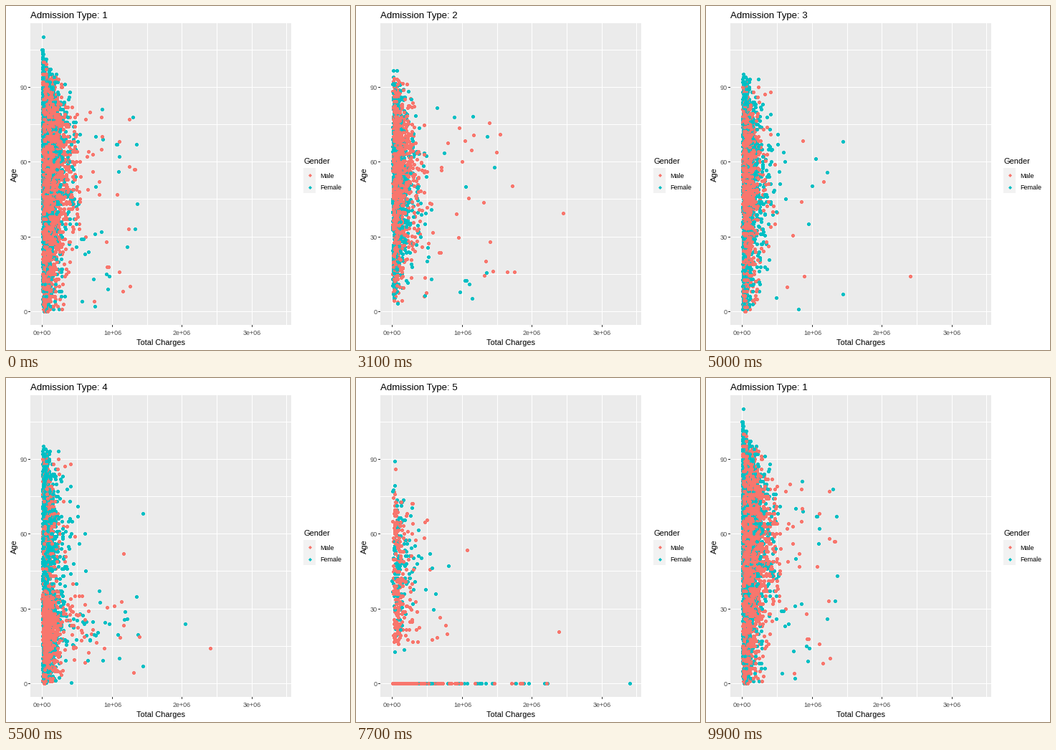
Recreate the animation shown at these times as a matplotlib script. Size 480 px wide and 480 px high, loop 10000 ms.

```python
import numpy as np
import matplotlib.pyplot as plt
from matplotlib.animation import FuncAnimation
from matplotlib.patches import Rectangle

SIZE, DPI = 480, 96
PT = 72 / DPI                       # points per pixel
RED, TEAL = "#F8766D", "#00BFC4"
PALETTE = np.array([[0xF8, 0x76, 0x6D, 255], [0x00, 0xBF, 0xC4, 255]]) / 255
M, F = 0, 1
FRAMES, STEPS = 100, 10
STARTS = [10, 30, 49, 69, 89]       # last still frame of each state

rng = np.random.default_rng(12)


def to_x(charge):
    """Pixel column of a charge in millions."""
    return np.floor(50.95 + 97.4 * charge)


def to_y(age):
    return np.floor(426.73 - 3.483 * age)


# ---------- data: one (charge, age) array per state and gender ----------

def ages(n, mean, sd, low, top, flat):
    """A bell of whole years over an even floor."""
    a = rng.normal(mean, sd, n)
    even = rng.uniform(low, min(top, 92), n)
    return np.round(np.where((rng.random(n) < flat) | (a < low) | (a > top), even, a))


def charges(n, median, spread, cap):
    x = median * np.exp(spread * rng.standard_normal(n))
    return np.where(x > cap, 2 * median * rng.random(n), x)


def people(n, median, spread, mean, sd, top, far, reach, low=0, flat=0.2):
    """A dense band of small charges plus a few far ones."""
    a = ages(n, mean, sd, low, top, flat)
    x = charges(n, median, spread, 0.5)
    x *= 0.65 + 0.45 * np.sin(np.pi * np.clip(a, 0, 100) / 100)
    x *= np.clip((107 - a) / 18, 0.1, 1)
    rows = rng.choice(n, far, replace=False)
    x[rows] = 0.5 + (reach - 0.5) * rng.random(far) ** 1.6
    a[rows] = np.round(rng.uniform(low, 82, far))
    return np.column_stack([x, a])


def babies(n, stray):
    """Everybody at age zero, but for a few stray ages at the end."""
    x = charges(n, 0.06, 1.3, 1.0)
    x[:n // 3] *= 0.45
    rows = rng.choice(n, 20, replace=False)
    x[rows] = rng.uniform(0.6, 2.3, 20)
    a = np.zeros(n)
    a[-stray:] = np.round(rng.uniform(18, 90, stray))
    x[-stray:] = rng.uniform(0, 0.05, stray)
    return np.column_stack([x, a])


emergency = [people(3500, .078, .85, 57, 21, 100, far=32, reach=1.4),
             people(3500, .052, .98, 60, 22, 105, far=26, reach=1.4)]
urgent = [people(1100, .08, .95, 56, 20, 98, far=32, reach=2.0),
          people(1100, .055, 1.0, 56, 22, 98, far=20, reach=1.7)]
elective = [people(1300, .06, .85, 58, 18, 92, far=6, reach=1.5),
            people(1750, .055, .95, 58, 20, 95, far=14, reach=1.5)]
newborn = [babies(800, stray=3), babies(600, stray=6)]
other = [people(260, .08, .85, 52, 22, 96, far=9, reach=1.4, low=20, flat=.4),
         people(150, .09, .9, 66, 18, 99, far=6, reach=.8, low=12, flat=.1)]
STATES = [emergency, urgent, elective, newborn, other]

# the points that stand furthest out
emergency[F][3000] = .02, 110
urgent[M][500] = 2.71, 37
elective[M][1000] = 2.41, 14
newborn[F][300] = 3.4, 0
elective[F][300] = .02, 60
other[M][10] = 2.99, 26

# stacking order; the first male rows tend to lie on top
depth = [rng.random(3500), rng.random(3500)]
depth[M][:800] += .3


def blend(state, t):
    """Rows with a partner in the next state move; the rest wait."""
    points = []
    for a, b in zip(STATES[state], STATES[(state + 1) % 5]):
        p = a.copy()
        m = min(len(a), len(b))
        p[:m] += t * (b[:m] - a[:m])
        points.append(p)
    return points


def moment(frame):
    """State index and progress to the next one."""
    state, t = 0, 0
    for i, start in enumerate(STARTS):
        if frame >= start:
            state, t = i, (frame - start) / STEPS
    return ((state + 1) % 5, 0) if t >= 1 else (state, t)


# ---------- stage ----------

fig = plt.figure(figsize=(SIZE / DPI, SIZE / DPI), dpi=DPI, facecolor="white")
ax = fig.add_axes([0, 0, 1, 1])
ax.set_xlim(0, SIZE)
ax.set_ylim(SIZE, 0)
ax.axis("off")


def box(x, y, w, h, color):
    ax.add_patch(Rectangle((x, y), w, h, color=color, lw=0, antialiased=False))


def label(x, y, s, px, color="black", **kw):
    kw.setdefault("va", "baseline")
    return ax.text(x, y, s, fontsize=px * PT, color=color,
                   family="Liberation Sans", **kw)


def dot(x, y, color, z):
    """A diamond five pixels wide, centred on a pixel."""
    side = 5 / np.sqrt(2) * PT
    return ax.scatter([x + .5], [y + .5], s=side ** 2, c=[color], marker="D",
                      linewidths=0, antialiased=False, zorder=z)


box(34, 24, 364, 421, "#EBEBEB")
for i in range(8):
    x, y = to_x(i / 2), to_y(15 * i)
    box(x, 24, 1, 421, "white")
    box(34, y, 364, 1, "white")
    if i % 2 == 0:
        box(x, 445, 1, 3, "#333333")
        box(31, y, 3, 1, "#333333")
        label(x + .5, 459, f"{i // 2}e+0{6 if i else 0}", 9, "#4D4D4D", ha="center")
        label(29.5, y + 4, str(15 * i), 9, "#4D4D4D", ha="right")

label(216, 473, "Total Charges", 11, ha="center")
label(12, 235, "Age", 11, rotation=90, ha="center", va="center")
label(415, 220, "Gender", 11)
box(415, 226, 17, 35, "#F2F2F2")
for y, name, color in ((235, "Male", RED), (252, "Female", TEAL)):
    dot(423, y, color, 4)
    label(438, y + 4.5, name, 9)

title = label(34, 17, "", 13.3)
cloud = dot(50, 426, TEAL, 3)


def draw(frame):
    state, t = moment(frame)
    male, female = blend(state, t)
    pts = np.vstack([male, female])
    sex = np.repeat([M, F], [len(male), len(female)])
    order = np.argsort(np.concatenate([depth[M][:len(male)],
                                       depth[F][:len(female)]]))
    sex = sex[order]
    spots = np.column_stack([to_x(pts[order, 0]), to_y(pts[order, 1])])
    # of the dots on one spot only the topmost shows
    key = (spots[:, 0] * 1000 + spots[:, 1])[::-1]
    top = np.sort(len(key) - 1 - np.unique(key, return_index=True)[1])
    cloud.set_offsets(spots[top] + .5)
    cloud.set_facecolors(PALETTE[sex[top]])
    title.set_text(f"Admission Type: {(state + (t >= .5)) % 5 + 1}")
    return cloud, title


anim = FuncAnimation(fig, draw, frames=FRAMES, interval=100, repeat=True,
                     cache_frame_data=False)
plt.show()
```
